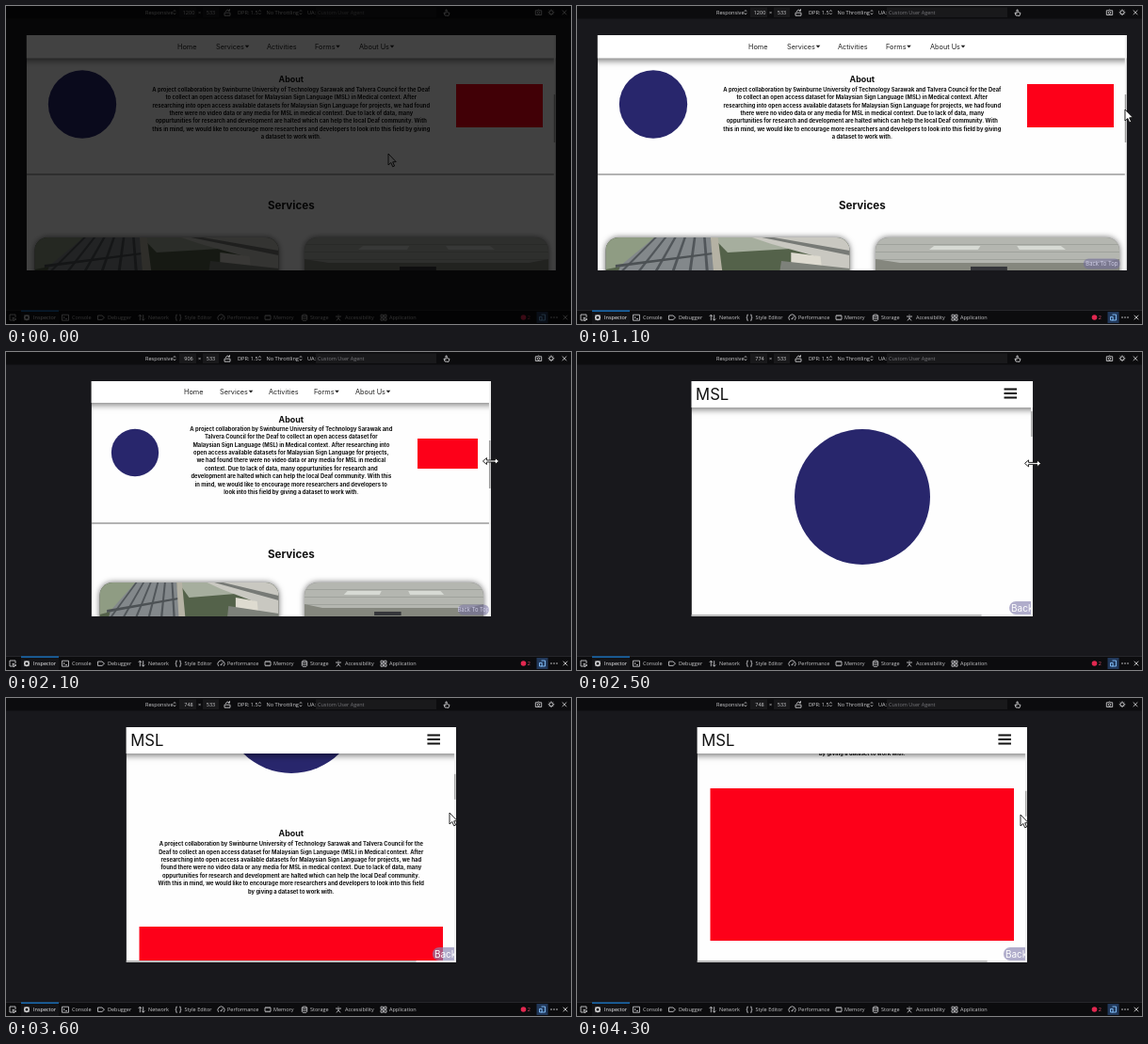
Write an HTML page with a canvas that moves like this. It is 600 px wide and 338 px high and loops after 4.4 s.

```html
<!DOCTYPE html>
<html lang="en">
<head>
<meta charset="utf-8">
<title>Responsive page demo</title>
<style>
html, body { margin: 0; width: 100%; height: 100%; overflow: hidden; background: #18181c; }
canvas { display: block; width: 600px; height: 338px; }
</style>
</head>
<body>
<canvas id="stage" width="600" height="338"></canvas>
<script>
const g = document.getElementById('stage').getContext('2d');
const LOOP = 4400, STEP = 100;
const TOP = 31, BOTTOM = 281, MID = 302.8, SCALE = 0.4683;
const MOBILE = 785;
const SITE = 'Inter, sans-serif', TOOLS = '"Open Sans", sans-serif';
const NAVY = '#28266c', RED = '#fd0019';

const words = ('A project collaboration by Swinburne University of Technology Sarawak and ' +
  'Talvera Council for the Deaf to collect an open access dataset for Malaysian Sign Language (MSL) ' +
  'in Medical context. After researching into open access available datasets for Malaysian Sign ' +
  'Language for projects, we had found there were no video data or any media for MSL in medical ' +
  'context. Due to lack of data, many oppurtunities for research and development are halted which ' +
  'can help the local Deaf community. With this in mind, we would like to encourage more ' +
  'researchers and developers to look into this field by giving a dataset to work with.').split(' ');

// Words per line for each layout width
const wraps = {
  wide: [15, 15, 15, 19, 15, 19, 5],
  medium: [12, 16, 13, 19, 15, 15, 13],
  narrow: [10, 12, 10, 10, 15, 11, 12, 12, 11],
  mobile: [14, 16, 14, 20, 14, 18, 7]
};

const lerp = (a, b, k) => a + (b - a) * k;
const clamp = v => Math.max(0, Math.min(1, v));
const smooth = v => { v = clamp(v); return v * v * (3 - 2 * v); };

// Piecewise linear value through [position, value] points
function track(points, p) {
  if (p <= points[0][0]) return points[0][1];
  for (let i = 1; i < points.length; i++) {
    const [a, va] = points[i - 1], [b, vb] = points[i];
    if (p <= b) return lerp(va, vb, (p - a) / (b - a));
  }
  return points[points.length - 1][1];
}

const widthKeys = [[1200, 1200], [1300, 1172], [1500, 1104], [1800, 1069], [2100, 906], [2400, 800], [2600, 748]];
const cursorY = [[1000, 110], [1500, 111], [2100, 116], [2600, 119], [3000, 120], [3600, 122], [4300, 124]];

function rect(x, y, w, h, color) {
  g.fillStyle = color;
  g.fillRect(x, y, w, h);
}

function rounded(x, y, w, h, r, color) {
  g.beginPath();
  g.roundRect(x, y, w, h, r);
  g.fillStyle = color;
  g.fill();
}

function disc(x, y, r, color) {
  g.beginPath();
  g.arc(x, y, r, 0, Math.PI * 2);
  g.fillStyle = color;
  g.fill();
}

function poly(points, color) {
  g.beginPath();
  points.forEach(([x, y]) => g.lineTo(x, y));
  g.closePath();
  g.fillStyle = color;
  g.fill();
}

// y is the middle of the capital letters
function label(s, x, y, size, color, { family = SITE, weight = 400, align = 'left' } = {}) {
  g.font = `${weight} ${size}px ${family}`;
  g.textAlign = align;
  g.fillStyle = color;
  g.fillText(s, x, y + size * 0.36);
}

function stroke(path, x, y, color = '#c8c8ca', width = 0.9) {
  g.save();
  g.translate(x, y);
  g.strokeStyle = color;
  g.lineWidth = width;
  g.stroke(new Path2D(path));
  g.restore();
}

const icons = {
  pick: 'M1 3H-3V-3H3V0M0 0L4 2L2 2.5L1.5 4Z',
  inspect: 'M-2 -2H2V2H-2ZM-3 0H-2M2 0H3M0 -3V-2M0 2V3',
  console: 'M-3.5 -3H3.5V3H-3.5ZM-2 -1L-.8 0L-2 1M0 1.4H2',
  debug: 'M-3.5 -2.2H1L3.5 0L1 2.2H-3.5Z',
  network: 'M-1.7 3V-3M-3.3 -1.3L-1.7 -3L-.1 -1.3M1.7 -3V3M.1 1.3L1.7 3L3.3 1.3',
  style: 'M-1.2 -3H-2.2V-.7L-3.2 0L-2.2 .7V3H-1.2M1.2 -3H2.2V-.7L3.2 0L2.2 .7V3H1.2',
  speed: 'M-2.8 2.6A3.6 3.6 0 1 1 2.8 2.6M0 1L1.8 -1.2M-1 1.4H1',
  memory: 'M-3 -2H3V2H-3ZM-2 -3V-2M0 -3V-2M2 -3V-2M-2 2V3M0 2V3M2 2V3',
  storage: 'M-2.7 -2.2A2.7 1 0 0 1 2.7 -2.2V2.2A2.7 1 0 0 1 -2.7 2.2ZM-2.7 -2.2A2.7 1 0 0 0 2.7 -2.2M-2.7 0A2.7 1 0 0 0 2.7 0',
  access: 'M-3 -1.2H3M0 -1.2V.6L-2 3.2M0 .6L2 3.2M-.4 -2.9H.4',
  app: 'M-3 -3H-.6V-.6H-3ZM.6 -3H3V-.6H.6ZM-3 .6H-.6V3H-3ZM.6 .6H3V3H.6Z',
  rotate: 'M-3 0H3V3H-3ZM-1.5 -1A2 2 0 0 1 2 -2.4M2.5 -4V-2H.8',
  touch: 'M-2 3L-3 0L-1 1V-3H.2V-.5L3 .4L2 3.4Z',
  camera: 'M-3.2 -2H-1.2L-.6 -2.8H.6L1.2 -2H3.2V2.7H-3.2ZM1.3 .3A1.3 1.3 0 1 1 -1.3 .3A1.3 1.3 0 1 1 1.3 .3',
  gear: 'M2 0A2 2 0 1 1 -2 0A2 2 0 1 1 2 0M0 -3.3V-2M0 2V3.3M-3.3 0H-2M2 0H3.3M-2.3 -2.3L-1.4 -1.4M1.4 1.4L2.3 2.3M-2.3 2.3L-1.4 1.4M1.4 -1.4L2.3 -2.3',
  close: 'M-2.3 -2.3L2.3 2.3M2.3 -2.3L-2.3 2.3',
  updown: 'M-1.2 -.8L0 -2.3L1.2 -.8M-1.2 .8L0 2.3L1.2 .8',
  device: 'M-1 -3H3V3H-1M-3 -.6H-.4V3H-3Z'
};

const tabs = [
  ['inspect', 22, 'Inspector', 29], ['console', 63, 'Console', 70], ['debug', 101, 'Debugger', 108],
  ['network', 144, 'Network', 151], ['style', 183, 'Style Editor', 189.5], ['speed', 228.5, 'Performance', 235],
  ['memory', 278, 'Memory', 284], ['storage', 317, 'Storage', 323], ['access', 353, 'Accessibility', 360],
  ['app', 401, 'Application', 407]
];

function toolbars(w) {
  const ui = { family: TOOLS }, ink = '#cfcfd1';
  rect(0, 0, 600, 13.5, '#0c0c0e');
  label('Responsive', 148, 6.7, 5.6, ink, ui);
  stroke(icons.updown, 179, 6.7, ink, 0.7);
  rect(184, 1.5, 18, 10.5, '#19191b');
  rect(209, 1.5, 17, 10.5, '#19191b');
  label(String(Math.round(w)), 194, 6.7, 5.5, ink, { family: TOOLS, align: 'center' });
  label('×', 205.5, 6.7, 5.5, ink, { family: TOOLS, align: 'center' });
  label('533', 217.5, 6.7, 5.5, ink, { family: TOOLS, align: 'center' });
  stroke(icons.rotate, 235, 7.2);
  label('DPR: 1.5', 246, 6.7, 5.6, ink, ui);
  stroke(icons.updown, 269.5, 6.7, ink, 0.7);
  label('No Throttling', 276.5, 6.7, 5.6, ink, ui);
  stroke(icons.updown, 313, 6.7, ink, 0.7);
  label('UA:', 320, 6.7, 5.6, ink, ui);
  rect(329, 1.5, 128, 10.5, '#19191b');
  label('Custom User Agent', 331, 6.7, 5.5, '#77777b', ui);
  stroke(icons.touch, 468, 7);
  stroke(icons.camera, 565.5, 6.8);
  stroke(icons.gear, 579, 6.8);
  stroke(icons.close, 593, 6.8);

  rect(0, 323.5, 600, 14.5, '#0c0c0e');
  rect(0, 323, 600, 0.7, '#303034');
  rect(16, 324, 40, 14, '#141417');
  rect(16, 323.5, 40, 1.2, '#1680dc');
  stroke(icons.pick, 7, 331);
  for (const [icon, ix, name, x] of tabs) {
    const on = icon === 'inspect';
    stroke(icons[icon], ix, 331.2, on ? '#f0f0f2' : '#c0c0c3', on ? 1.2 : 0.9);
    label(name, x, 331.2, 5.5, on ? '#f4f4f6' : '#c8c8ca', ui);
  }
  disc(549.5, 331, 2.8, '#e22850');
  label('2', 553.7, 331.2, 5.5, '#d8506c', ui);
  rect(563.5, 325, 12, 12, '#21385a');
  stroke(icons.device, 569.5, 331, '#86c4ff');
  for (const x of [579, 582, 585]) disc(x, 331, 0.8, '#c8c8ca');
  stroke(icons.close, 594, 331);
}

function header(left, width, bottom) {
  g.save();
  g.shadowColor = 'rgba(0,0,0,.55)';
  g.shadowBlur = 7;
  g.shadowOffsetY = 2;
  rect(left - 9, TOP - 9, width + 18, bottom - TOP + 9, '#fff');
  g.restore();
}

function paragraph(y, counts) {
  let from = 0;
  counts.forEach((n, i) => {
    label(words.slice(from, from + n).join(' '), MID, y + i * 8.47, 5.8, '#111', { weight: 700, align: 'center' });
    from += n;
  });
}

function card(x, y, w, paint) {
  g.save();
  g.shadowColor = 'rgba(0,0,0,.6)';
  g.shadowBlur = 6;
  rounded(x, y, w, 120, 14, '#888');
  g.restore();
  g.save();
  g.beginPath();
  g.roundRect(x, y, w, 120, 14);
  g.clip();
  const shape = (pts, color) => poly(pts.map(([px, py]) => [x + px * w, y + py]), color);
  paint(shape);
  g.restore();
}

function shelter(shape) {
  shape([[0, 0], [1, 0], [1, 60], [0, 60]], '#54624a');
  shape([[0, 0], [.2, 0], [.08, 30], [0, 34]], '#8f9c83');
  shape([[.44, 0], [.72, 0], [.76, 12], [.5, 16]], '#a6ae9e');
  shape([[.2, 0], [.43, 0], [.47, 60], [.02, 60], [.06, 30]], '#83888b');
  for (let i = 0; i < 6; i++) {
    const a = .2 + i * .04, b = .06 + i * .07;
    shape([[a, 0], [a + .01, 0], [b + .012, 36], [b, 36]], '#51565a');
  }
  shape([[.04, 29], [.44, 16], [.44, 18], [.04, 32]], '#4c5154');
  shape([[.43, 0], [.46, 0], [.49, 60], [.45, 60]], '#b5b2a4');
  shape([[.6, 0], [1, 0], [1, 60], [.92, 60], [.86, 20], [.68, 7]], '#c9c8c1');
  shape([[.64, 0], [.69, 0], [1, 14], [1, 19]], '#777a76');
  shape([[.76, 16], [.88, 20], [.9, 60], [.76, 60]], '#dedbd0');
  shape([[.72, 25], [1, 33], [1, 60], [.7, 60]], '#7d817a');
}

function room(shape) {
  shape([[0, 0], [1, 0], [1, 60], [0, 60]], '#b4b6b0');
  for (let i = 0; i < 3; i++) {
    const y = 7 + i * 8;
    shape([[0, y], [1, y], [1, y + 1], [0, y + 1]], '#9fa29c');
  }
  shape([[.24, 9], [.43, 9], [.42, 13], [.22, 13]], '#d7dad4');
  shape([[.58, 9], [.76, 9], [.78, 13], [.59, 13]], '#d7dad4');
  shape([[0, 23], [.1, 27], [.92, 27], [1, 23], [1, 60], [0, 60]], '#85877e');
  shape([[.39, 31], [.54, 31], [.54, 35], [.39, 35]], '#35363a');
  shape([[.1, 36], [.31, 36], [.31, 60], [.1, 60]], '#bec2c0');
  shape([[.64, 36], [.88, 36], [.88, 60], [.64, 60]], '#b9bdbb');
}

function desktop(w, left, right, pill) {
  const k = (1200 - w) / 294;
  const row = (a, b, c) => track([[906, a], [1104, b], [1200, c]], w);
  const span = lerp(92, 64, k);

  disc(lerp(81, 137, k), row(107, 102, 104.5), span * 0.393, NAVY);
  rect(lerp(478, 437, k), row(108, 102, 106) - span / 4, span, span / 2, RED);
  label('About', MID, row(71.5, 73.5, 78), 8.9, '#111', { weight: 700, align: 'center' });
  paragraph(row(81.5, 84, 88.5), w > 1150 ? wraps.wide : w > 1000 ? wraps.medium : wraps.narrow);
  rect(left, row(182, 170, 179) - 0.5, right - left, 1, '#6a6a6a');
  label('Services', MID, row(214.5, 202.5, 211.5), 11.6, '#111', { weight: 700, align: 'center' });

  const photoY = row(245, 236, 246), photoW = lerp(259, 190, k);
  card(289.5 - photoW, photoY, photoW, shelter);
  card(317, photoY, photoW, room);

  const bar = lerp(55.5, 54, k);
  header(left, right - left, bar);
  const links = [['Home', 182, 189], ['Services', 223, 227, 33], ['Activities', 277, 279],
    ['Forms', 328, 327, 24.5], ['About Us', 375, 371, 35]];
  for (const [name, a, b, caret] of links) {
    const x = lerp(a, b, k), y = 43 - k;
    label(name, x, y, 7.3, '#222');
    if (caret) poly([[x + caret - 2.3, y - 1.3], [x + caret + 2.3, y - 1.3], [x + caret, y + 1.4]], '#222');
  }

  rect(right - 2, TOP, 2, BOTTOM - TOP, '#f0f0f0');
  rect(right - 2, 94, 1.6, 51, '#999');
  g.globalAlpha = pill;
  const pw = lerp(39, 33, k), px = right - lerp(7, 2, k) - pw;
  rounded(px, 268.5, pw, 11, 5.5, 'rgba(112,106,160,.5)');
  label('Back To Top', px + pw / 2, 274, 5.8, '#cfcde6', { align: 'center' });
  g.globalAlpha = 1;
}

function mobile(left, right, scroll) {
  disc(303, 154 - scroll, 72, NAVY);
  label('About', MID, 290 - scroll, 8.9, '#111', { weight: 700, align: 'center' });
  paragraph(301 - scroll, wraps.mobile);
  rect(141.5, 389 - scroll, 322.5, 162, RED);
  header(left, right - left, 59);
  label('MSL', left + 4.5, 45.3, 16.7, '#111');
  for (const y of [38.5, 43, 47.5]) rect(right - 30.5, y, 13.5, 2, '#111');

  rounded(right - 25, 265, 46, 14, 7, 'rgba(137,132,178,.66)');
  label('Back', right - 23, 272, 10, '#fff');
  rect(right - 2, 59, 2, BOTTOM - 59, '#f0f0f0');
  rect(right - 2, 63 + scroll * 0.122, 1.6, 27, '#aaa');
  rect(left, 279, right - left, 2, '#eee');
  rect(left, 279.2, 308, 1.4, '#aaa');
}

function outlined(points, x, y) {
  g.save();
  g.translate(x, y);
  g.lineJoin = 'round';
  poly(points, '#fff');
  g.strokeStyle = '#111';
  g.lineWidth = 0.9;
  g.stroke();
  g.restore();
}

const arrow = [[0, 0], [0, 12], [2.8, 9.5], [4.7, 13.8], [6.6, 13], [4.7, 8.8], [8.2, 8.6]];
const resize = [[-8.5, 0], [-4.5, -3.5], [-4.5, -1], [4.5, -1], [4.5, -3.5], [8.5, 0],
  [4.5, 3.5], [4.5, 1], [-4.5, 1], [-4.5, 3.5]];

function cursor(t, right) {
  if (t < 1300) {
    const k = smooth((t - 300) / 700);
    outlined(arrow, lerp(406, 582, k), lerp(157, 110, k));
  } else if (t < 2700) {
    outlined(resize, right, track(cursorY, t));
  } else {
    outlined(arrow, lerp(right, 471, clamp((t - 2600) / 300)), track(cursorY, t));
  }
}

function draw(t) {
  const w = track(widthKeys, t);
  const left = MID - w * SCALE / 2, right = MID + w * SCALE / 2;
  const scroll = 146 * smooth((t - 3050) / 500) + 147 * smooth((t - 3650) / 500);

  rect(0, 0, 600, 338, '#18181c');
  g.save();
  g.beginPath();
  g.rect(left, TOP, right - left, BOTTOM - TOP);
  g.clip();
  rect(left, TOP, right - left, BOTTOM - TOP, '#fefefe');
  if (w > MOBILE) desktop(w, left, right, clamp((t - 700) / 300));
  else mobile(left, right, scroll);
  g.restore();

  toolbars(w);
  cursor(t, right);
  const dark = 0.74 * (1 - clamp(t / 500));
  if (dark > 0) rect(0, 0, 600, 338, `rgba(0,0,0,${dark})`);
}

const start = performance.now();
function tick() {
  // The motion advances in tenths of a second
  const t = (performance.now() - start) % LOOP;
  draw(Math.floor(t / STEP) * STEP);
  requestAnimationFrame(tick);
}
tick();
</script>
</body>
</html>
```
